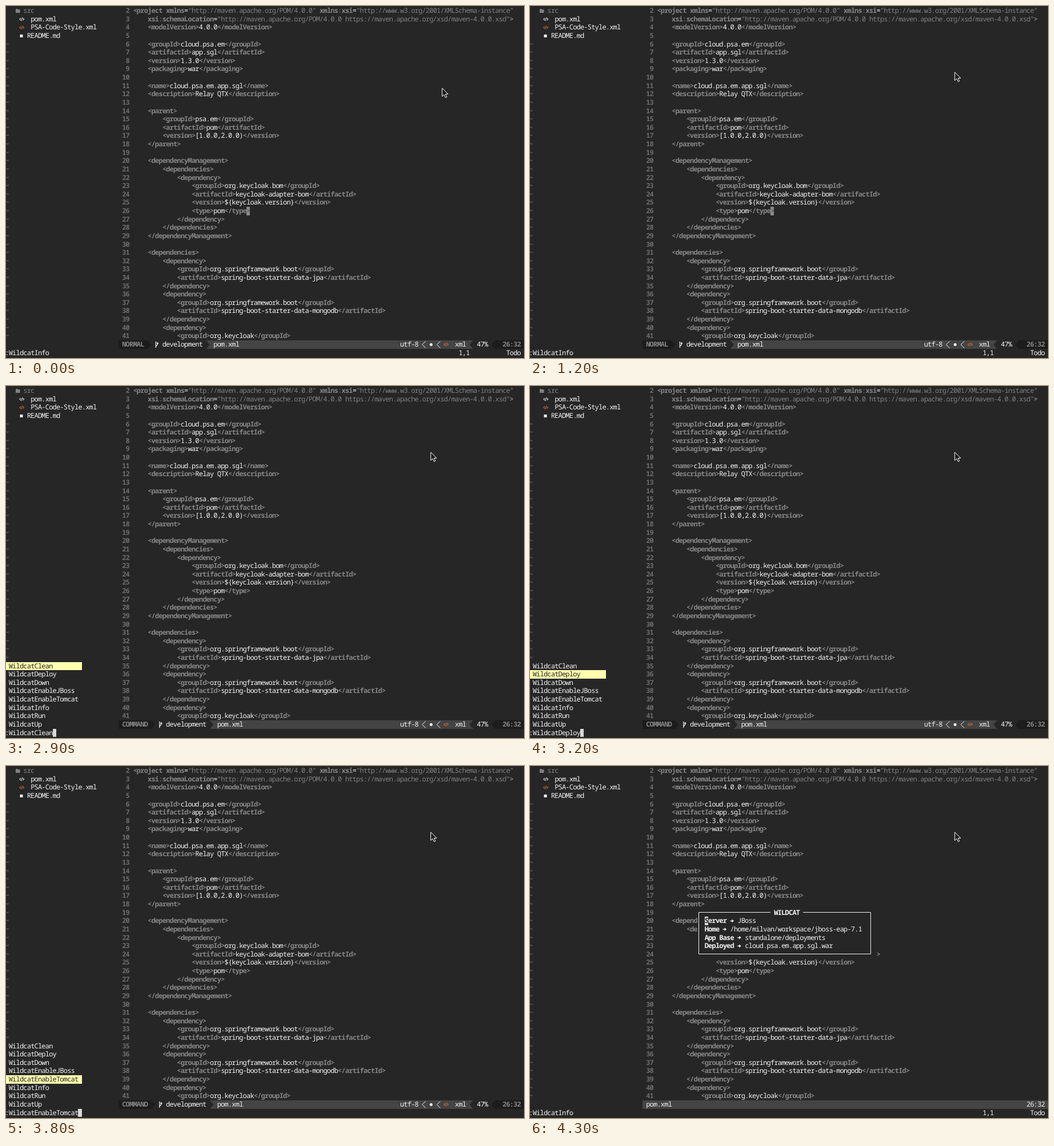
These frames come from a looping animation (907 px wide and 617 px high, 8 s). An HTML page:

```html
<!DOCTYPE html>
<html lang="en">
<head>
<meta charset="utf-8">
<title>Editor session</title>
<style>
  html, body { margin: 0; width: 100%; height: 100%; overflow: hidden; background: #262626; }
  #stage {
    position: relative; width: 907px; height: 617px; overflow: hidden;
    background: #262626; color: #f4f4f4;
    font: 12px/14.62px "Noto Sans Mono", "DejaVu Sans Mono", monospace;
    letter-spacing: calc(6.404px - .6em);
    text-rendering: geometricPrecision;
    font-variant-ligatures: none;
  }
  #stage > div, svg { position: absolute; left: 0; top: 0; width: 907px; height: 617px; }
  span { position: absolute; white-space: pre; height: 14.62px; }
  b, .bold { font-weight: bold; }
  .code b, .gray { color: #858585; }
  .code i { color: #808080; font-style: normal; }
  .code b i { color: #585858; }
  .dim { color: #6c6c6c; font-weight: 600; }
  .cursor { background: #8a8a8a; color: #444; }
  .block { background: #d8d8d8; color: #262626; }
  .picked { background: #ffffaf; color: #262626; }
</style>
</head>
<body>
<div id="stage"><div id="base"></div><div id="ui"></div></div>

<script type="text/plain" id="pom">
<project xmlns="http://maven.apache.org/POM/4.0.0" xmlns:xsi="http://www.w3.org/2001/XMLSchema-instance"
    xsi:schemaLocation="http://maven.apache.org/POM/4.0.0 https://maven.apache.org/xsd/maven-4.0.0.xsd">
    <modelVersion>4.0.0</modelVersion>

    <groupId>cloud.psa.em</groupId>
    <artifactId>app.sgl</artifactId>
    <version>1.3.0</version>
    <packaging>war</packaging>

    <name>cloud.psa.em.app.sgl</name>
    <description>Relay QTX</description>

    <parent>
        <groupId>psa.em</groupId>
        <artifactId>pom</artifactId>
        <version>[1.0.0,2.0.0)</version>
    </parent>

    <dependencyManagement>
        <dependencies>
            <dependency>
                <groupId>org.keycloak.bom</groupId>
                <artifactId>keycloak-adapter-bom</artifactId>
                <version>${keycloak.version}</version>
                <type>pom</type>
            </dependency>
        </dependencies>
    </dependencyManagement>

    <dependencies>
        <dependency>
            <groupId>org.springframework.boot</groupId>
            <artifactId>spring-boot-starter-data-jpa</artifactId>
        </dependency>
        <dependency>
            <groupId>org.springframework.boot</groupId>
            <artifactId>spring-boot-starter-data-mongodb</artifactId>
        </dependency>
        <dependency>
            <groupId>org.keycloak</groupId>
</script>

<script>
const LOOP = 8000, CELL = 6.404, ROW = 14.62;
const PAGE = '#262626', DARK = '#1c1c1c', BAR = '#444', INK = '#f4f4f4', ORANGE = '#c4662c';
const STATUS = 40, PROMPT = 41;
const colX = col => -1.7 + col * CELL;
const rowY = row => 1.15 + row * ROW;
const midY = row => rowY(row) + ROW / 2;

const escape = s => s.replace(/&/g, '&amp;').replace(/</g, '&lt;').replace(/>/g, '&gt;');
const span = (col, row, html, cls = '') =>
  `<span class="${cls}" style="left:${colX(col)}px;top:${rowY(row)}px">${html}</span>`;
const put = (col, row, text, cls) => span(col, row, escape(text), cls);

// Vector parts
const svg = inner => `<svg viewBox="0 0 907 617">${inner}</svg>`;
const path = (d, stroke, fill = 'none', width = 1) =>
  `<path d="${d}" stroke="${stroke}" fill="${fill}" stroke-width="${width}"/>`;
const rect = (col, row, endCol, endRow, fill) => {
  const [x, y, right, bottom] = [colX(col), rowY(row), colX(endCol), rowY(endRow)].map(Math.round);
  return `<rect x="${x}" y="${y}" width="${right - x}" height="${bottom - y}" fill="${fill}"/>`;
};
const barPart = (col, endCol, fill) => rect(col, STATUS, endCol, STATUS + 1, fill);
const codeIcon = (col, row, color) =>
  path(`M${colX(col) + 2} ${midY(row) - 2}l-2 2 2 2m3.6-4l2 2-2 2m-.8-5l-2 6`, color, 'none', 1.2);
const wedge = (col, toRight, fill) => {
  const from = colX(toRight ? col : col + 1), tip = colX(toRight ? col + 1 : col);
  return path(`M${from} 586L${tip} 593.5L${from} 601Z`, 'none', fill);
};
const chevron = col => path(`M${colX(col + 1)} 587.5l-6 6 6 6`, INK);
const pointer = ([x, y]) =>
  path(`M${x + .7} ${y + 1}v14.5l3.4-3.2 2.4 5.2 2.4-1-2.3-5.1h4.4z`, '#fff', DARK);

function highlight(line) {
  return line.split(/("[^"]*"|<\/?\w+>?|[\w:]+(?==")|>)/).map((part, i) => {
    const text = escape(part);
    if (i % 2 === 0) return text;
    if (part[0] === '"') return `<i>${text}</i>`;
    return `<b>${text.replace(':', '<i>:</i>')}</b>`;
  }).join('');
}

function drawBase() {
  const lines = document.getElementById('pom').textContent.replace(/^\n|\n$/g, '').split('\n');
  let html = lines.map((line, row) =>
    put(32, row, String(row + 2).padStart(2), 'dim') + span(35, row, highlight(line), 'code')).join('');
  for (let row = 4; row < STATUS; row++) html += put(0, row, '~', 'dim');
  html += put(5, 0, 'src', 'gray') + put(7, 1, 'pom.xml') +
    put(7, 2, 'PSA-Code-Style.xml') + put(6, 3, 'README.md');
  html += svg(
    path('M17 5h3l1 1h3.5v6H17z', 'none', '#808080') +
    codeIcon(4, 1, '#d0dce4') + codeIcon(4, 2, ORANGE) +
    `<rect x="24.5" y="50" width="5" height="5" fill="${INK}"/>`);
  document.getElementById('base').innerHTML = html;
}

const commands = ['Clean', 'Deploy', 'Down', 'EnableJBoss', 'EnableTomcat', 'Info', 'Run', 'Up']
  .map(name => 'Wildcat' + name);
const REST = [743, 115];
const steps = [
  { at: 0, mode: 'NORMAL', mouse: [763, 143], typed: 'WildcatInfo', pick: -1 },
  { at: 900, mouse: REST },
  { at: 1100, mouse: [743, 109] },
  { at: 1200, mouse: REST },
  { at: 1300, mode: 'COMMAND', typed: '' },
  { at: 1500, typed: 'w' },
  { at: 1600, typed: 'wi' },
  { at: 1700, typed: 'wil' },
  ...[2900, 3200, 3400, 3600, 3800, 4000].map((at, pick) => ({ at, pick, typed: commands[pick] })),
  { at: 4300, mode: 'INFO', pick: -1 },
];

function statusBar(mode) {
  const bar = barPart(31, 142, BAR);
  if (mode === 'INFO')
    return svg(bar) + put(32, STATUS, 'pom.xml') + put(136, STATUS, '26:32');
  const modeEnd = 33 + mode.length, branchEnd = modeEnd + 16, branchX = colX(modeEnd + 2);
  return svg(bar +
      barPart(31, branchEnd, PAGE) + barPart(31, modeEnd, DARK) +
      wedge(modeEnd, true, DARK) + wedge(branchEnd, true, PAGE) +
      barPart(128, 142, PAGE) + barPart(134, 142, DARK) +
      wedge(127, false, PAGE) + wedge(133, false, DARK) +
      path(`M${branchX + 1.5} 588v11m0-2.5l3-3v-3m-1.5 1.5l1.5-2 1.5 2`, INK, 'none', 1.2) +
      chevron(114) + chevron(118) + codeIcon(120, STATUS, ORANGE) +
      `<circle cx="${colX(116.5)}" cy="593.5" r="2.5" fill="${INK}"/>`) +
    put(32, STATUS, mode, 'gray bold') + put(modeEnd + 4, STATUS, 'development') +
    put(branchEnd + 2, STATUS, 'pom.xml') + put(108, STATUS, 'utf-8') +
    put(123, STATUS, 'xml') + put(129, STATUS, '47%') + put(136, STATUS, '26:32', 'gray bold');
}

function menu(pick) {
  return svg(rect(0, 33, 21, PROMPT, PAGE)) + commands.map((name, i) =>
    put(0, 33 + i, (' ' + name).padEnd(21), i === pick ? 'picked' : '')).join('');
}

function infoWindow() {
  const entries = [
    ['Server', 'JBoss'],
    ['Home', '/home/milvan/workspace/jboss-eap-7.1'],
    ['App Base', 'standalone/deployments'],
    ['Deployed', 'cloud.psa.em.app.sgl.war'],
  ];
  let shapes = rect(46, 17, 95, 23, PAGE) + path('M421 256.5H295.5V329.5H596.5V256.5H478', INK);
  let text = put(67, 17, 'WILDCAT', 'bold');
  entries.forEach(([key, value], i) => {
    const row = 18 + i, arrow = 49 + key.length;
    text += put(48, row, key, 'bold') + put(arrow + 2, row, value);
    shapes += path(`M${colX(arrow)} ${midY(row)}h4`, INK, 'none', 1.4) +
      path(`M${colX(arrow) + 3} ${midY(row) - 3}l3.4 3-3.4 3z`, 'none', INK);
  });
  return svg(shapes) + text + put(48, 18, 'S', 'block bold');
}

function drawUi({ mode, mouse, typed, pick }) {
  let html = statusBar(mode) + put(0, PROMPT, ':' + typed);
  if (mode === 'COMMAND') html += put(1 + typed.length, PROMPT, ' ', 'block');
  else html += put(124, PROMPT, '1,1') + put(137, PROMPT, 'Todo');
  if (mode === 'NORMAL') html += put(66, 24, '>', 'cursor');
  if (mode === 'INFO') html += infoWindow();
  if (pick >= 0) html += menu(pick);
  document.getElementById('ui').innerHTML = html + svg(pointer(mouse));
}

let shown = 0;
function frame() {
  const time = performance.now() % LOOP;
  const past = steps.filter(step => step.at <= time);
  if (past.length !== shown) {
    shown = past.length;
    drawUi(Object.assign({}, ...past));
  }
  requestAnimationFrame(frame);
}

drawBase();
frame();
</script>
</body>
</html>
```
